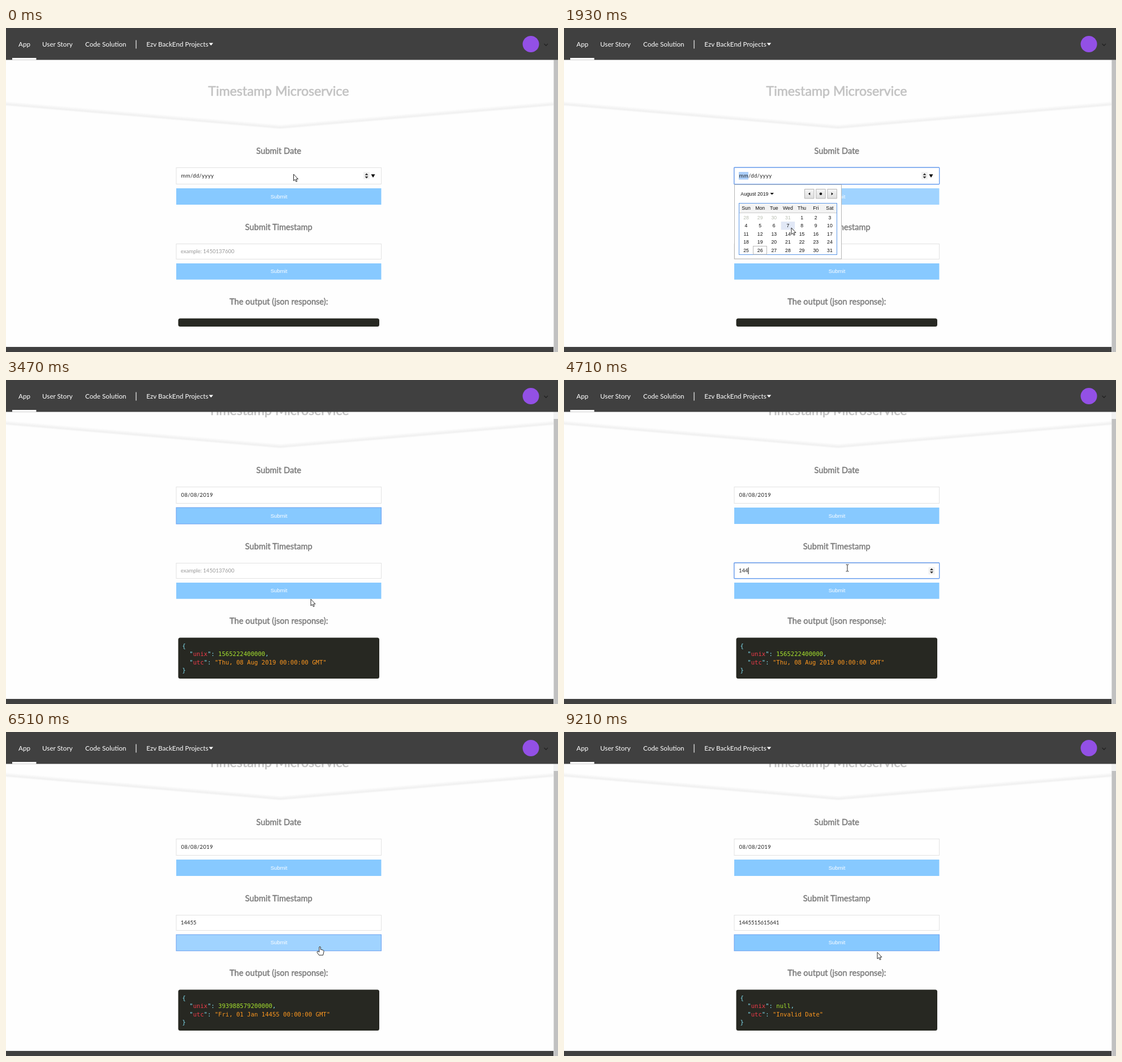
Write an HTML page that moves like this. It is 976 px wide and 574 px high and loops after 9530 ms.

```html
<!DOCTYPE html>
<html lang="en">
<head>
<meta charset="utf-8">
<title>Timestamp Microservice</title>
<style>
  html, body { margin: 0; width: 100%; height: 100%; overflow: hidden; background: #fefefe; }
  svg { display: block; font-family: Lato, sans-serif; }
  text { white-space: pre; }
  .nav { font-size: 11.7px; fill: #fff; }
  .heading { font-size: 14.6px; fill: #7b7b7b; stroke: #7b7b7b; stroke-width: .45; text-anchor: middle; }
  .title { font-size: 23.2px; fill: #c3c3c3; stroke: #c3c3c3; stroke-width: .7; text-anchor: middle; }
  .input { fill: #fff; stroke: #e2e2e2; }
  .focus { fill: none; stroke: #6a9ff0; stroke-width: 1.4; }
  .field { font-size: 9.5px; fill: #222; }
  .date { letter-spacing: .4px; }
  .label { font: 9.5px "Liberation Sans", Arial, sans-serif; fill: #fff; text-anchor: middle; }
  .calendar { font: 8.75px "Liberation Sans", Arial, sans-serif; fill: #111; }
  .day { text-anchor: middle; }
  .code { font: 10.6px "DejaVu Sans Mono", monospace; fill: #7fdcee; }
  .key { fill: #ee3b4a; } .number { fill: #a6e22e; } .string { fill: #fd971f; }
</style>
</head>
<body>
<svg width="976" height="574" viewBox="0 0 976 574">
  <defs>
    <linearGradient id="shade" x2="0" y2="1">
      <stop stop-color="#f0f0f0" stop-opacity="0"/>
      <stop offset=".65" stop-color="#f0f0f0"/>
      <stop offset="1" stop-color="#f0f0f0" stop-opacity="0"/>
    </linearGradient>
    <linearGradient id="bevel" x2="0" y2="1">
      <stop stop-color="#f6f6f6"/><stop offset="1" stop-color="#dedede"/>
    </linearGradient>
    <path id="spinner" d="M-3-1L0-4.5L3-1ZM-3 1.2L0 4.7L3 1.2Z" fill="#333"/>
  </defs>
  <rect width="976" height="574" fill="#fefefe"/>

  <g id="page">
    <path d="M0 0H485V9H0Z" transform="matrix(1 .085 0 1 0 129.5)" fill="url(#shade)"/>
    <path d="M0 0H484V9H0Z" transform="matrix(1 -.085 0 1 485 170.7)" fill="url(#shade)"/>
    <text class="title" x="482" y="120">Timestamp Microservice</text>

    <text class="heading" x="482.3" y="222.7">Submit Date</text>
    <rect class="input" x="301" y="247.5" width="362.5" height="29"/>
    <rect id="monthMark" x="309" y="255" width="17" height="13.5" fill="#a9cdf8"/>
    <text id="dateText" class="field date" x="309.5" y="265.2"></text>
    <g id="dateControls">
      <rect x="632" y="255" width="11" height="13" fill="#f1f1f1"/>
      <use href="#spinner" x="637.5" y="261.7"/>
      <path d="M645.5 259.3H652.5L649 265Z"/>
    </g>
    <rect id="dateFocus" class="focus" x="300.7" y="247" width="363" height="29.7" rx="1"/>
    <rect id="dateButton" x="301" y="284" width="362.5" height="29"/>
    <text class="label" x="482.5" y="302.3">Submit</text>

    <text class="heading" x="482.3" y="357.5">Submit Timestamp</text>
    <rect class="input" x="301" y="382.5" width="362.5" height="27"/>
    <text id="stampText" class="field" x="309" y="399.3"></text>
    <path id="caret" d="M0 390V402" stroke="#111"/>
    <g id="stampFocus">
      <rect class="focus" x="300.7" y="381.8" width="363" height="28" rx="1"/>
      <rect x="644.5" y="389.5" width="11" height="13" fill="#f1f1f1"/>
      <use href="#spinner" x="650" y="396"/>
    </g>
    <rect id="stampButton" x="301" y="417" width="362.5" height="28.7"/>
    <text class="label" x="482.5" y="434.3">Submit</text>

    <text class="heading" x="482.3" y="490">The output (json response):</text>
    <rect id="output" x="304.5" y="514.5" width="355.5" height="14.5" rx="3.5" fill="#272822"/>
    <g id="json" class="code">
      <text x="311.5" y="533">{</text>
      <text x="311.5" y="547.3">  "<tspan class="key">unix</tspan>": <tspan id="unix" class="number"></tspan>,</text>
      <text x="311.5" y="561.8">  "<tspan class="key">utc</tspan>": <tspan id="utc" class="string"></tspan></text>
      <text x="311.5" y="576.4">}</text>
    </g>
    <rect id="footer" y="565" width="968" height="80" fill="#404040"/>

    <g id="calendar" class="calendar">
      <rect x="301.5" y="277.5" width="189" height="131.5" fill="#fff" stroke="#b5b5b5"/>
      <text x="312.3" y="296.6">August 2019</text>
      <path d="M364.5 292H371L367.7 295.6Z"/>
      <g fill="url(#bevel)" stroke="#b4b4b4">
        <path d="M425.5 285.5H442V302H425.5ZM445.7 285.5H462.2V302H445.7ZM465.9 285.5H482.4V302H465.9Z"/>
      </g>
      <path d="M435.2 291.3V296.3L432 293.8ZM472.7 291.3V296.3L475.9 293.8Z"/>
      <circle cx="454" cy="293.8" r="2.3"/>
      <rect x="309.5" y="310.5" width="173" height="91" fill="#fff"/>
      <path d="M310 311H482V327.5H310Z" fill="#f3f3f3"/>
      <path d="M310 327.5H482" stroke="#ccc"/>
      <rect x="309.5" y="310.5" width="173" height="91" fill="none" stroke="#5b97e8"/>
      <rect id="hoverDay" y="343" width="24.5" height="14.5" fill="#e1e8f6"/>
      <rect x="334.5" y="386.5" width="24" height="14.5" fill="none" stroke="#b8b8b8"/>
      <g id="days"></g>
    </g>
  </g>

  <rect x="968" y="56" width="8" height="518" fill="#f1f1f1"/>
  <rect id="thumb" x="968.5" width="7.5" height="520" fill="#c1c1c1"/>

  <rect width="976" height="56.5" fill="#404040"/>
  <rect x="11" y="53" width="42.5" height="3.5" fill="#fff"/>
  <g class="nav">
    <text x="22" y="32.5">App</text>
    <text x="64" y="32.5">User Story</text>
    <text x="140" y="32.5">Code Solution</text>
    <path d="M229.5 21.5H230.6V36.5H229.5Z"/>
    <text x="248.3" y="32.5">Ezv BackEnd Projects</text>
    <path d="M358.7 26.5H366.3L362.5 31Z"/>
  </g>
  <circle cx="928" cy="28.5" r="14.5" fill="#9350e6"/>
  <path d="M951.5 28L954.8 31.3L958 28" fill="none" stroke="#222" stroke-width="1.3"/>

  <g id="cursor" stroke="#111" stroke-width=".9" fill="#fff" stroke-linejoin="round">
    <path id="arrow" d="M0 0V11.6L2.6 9.3L4.4 13.3L6.2 12.5L4.5 8.6H8Z"/>
    <path id="hand" d="M-1.2 1Q0-.6 1.2 1V5.2L5.6 6.4Q7.2 7 7 9.3L5.5 15.3H-1.6L-5 10.3Q-5 8-3 8.7L-1.2 10Z"/>
    <path id="beam" d="M-2.5-6H-.6L0-5.4L.6-6H2.5M0-5.4V5.4M-2.5 6H-.6L0 5.4L.6 6H2.5" fill="none"/>
  </g>
</svg>
<script>
const LOOP = 9530, SCROLL = 58;
const $ = id => document.getElementById(id);
const set = (id, attrs) => { for (const k in attrs) $(id).setAttribute(k, attrs[k]); };
const show = (id, on) => { $(id).style.display = on ? '' : 'none'; };
const write = (id, text) => { if ($(id).textContent !== text) $(id).textContent = text; };
const clamp = v => Math.max(0, Math.min(1, v));
const smooth = v => v * v * (3 - 2 * v);

// Pointer stops: time, x, y
const pointerPath = [
  [70, 508.5, 259], [610, 727, 275], [840, 727, 275], [1130, 649, 262], [1230, 649, 262],
  [1480, 580, 294], [1760, 402, 354], [1930, 402, 354], [2150, 421, 349], [2350, 421, 349],
  [2800, 496, 306], [3050, 496, 306], [3430, 539, 388.3], [3490, 539, 388.3], [3700, 501, 333],
  [5330, 501, 333], [5790, 555, 380], [5960, 555, 380], [6260, 554, 392], [6330, 554, 392],
  [6500, 555, 380], [6540, 555, 380], [6730, 534, 339], [6830, 534, 339], [6900, 537, 343],
  [8140, 537, 343], [8600, 555, 380], [8830, 555, 380], [9200, 554, 390.3]
];
// Typing: time, number of digits entered
const typing = [[4460, 1], [4540, 2], [4710, 3], [4780, 4], [4950, 5], [7210, 6], [7440, 8],
  [7590, 10], [7660, 12], [7740, 13]];
const STAMP = '1445515615641';

const responses = [
  [3000, '1565222400000', '"Thu, 08 Aug 2019 00:00:00 GMT"'],
  [5960, '393988579200000', '"Fri, 01 Jan 14455 00:00:00 GMT"'],
  [8830, 'null', '"Invalid Date"']
];

const latest = (list, t) => list.filter(item => t >= item[0]).pop();

function pointerAt(t) {
  const next = pointerPath.findIndex(stop => stop[0] > t);
  if (next === 0) return pointerPath[0].slice(1);
  if (next < 0) return pointerPath.at(-1).slice(1);
  const [t0, x0, y0] = pointerPath[next - 1], [t1, x1, y1] = pointerPath[next];
  const p = smooth((t - t0) / (t1 - t0));
  return [x0 + (x1 - x0) * p, y0 + (y1 - y0) * p];
}

function buildCalendar() {
  const add = (text, col, y, fill) => {
    const el = document.createElementNS('http://www.w3.org/2000/svg', 'text');
    el.setAttribute('class', 'day');
    el.setAttribute('x', 322 + col * 24.65);
    el.setAttribute('y', y);
    el.setAttribute('fill', fill);
    el.textContent = text;
    $('days').append(el);
  };
  'Sun Mon Tue Wed Thu Fri Sat'.split(' ').forEach((name, i) => add(name, i, 322, '#111'));
  for (let i = 0; i < 35; i++) {
    const day = i < 4 ? 28 + i : i - 3;
    add(day, i % 7, 338.6 + Math.floor(i / 7) * 14.5, i < 4 ? '#b9beb2' : '#111');
  }
}

function paintButton(id, hovered, focused) {
  set(id, { fill: hovered ? '#a0d3ff' : '#87c9ff', stroke: focused ? '#6a9ff0' : 'none' });
}

function render(t) {
  const [x, y] = pointerAt(t);
  const response = latest(responses, t);
  const scroll = SCROLL * smooth(clamp((t - 3000) / 380));
  const pageY = y + scroll;
  const popup = t >= 1230 && t < 2310;
  const overPopup = popup && x < 491 && pageY > 277 && pageY < 409;
  const over = (top, bottom) => !overPopup && x > 301 && x < 664 && pageY >= top && pageY <= bottom;
  const overDateButton = over(284, 313), overStampButton = over(417, 445.8);
  const overStamp = over(382, 410);
  const dateFocused = t >= 1230 && t < 2800;
  const stampFocused = t >= 3850 && t < 5750 || t >= 6730 && t < 8580;

  set('page', { transform: `translate(0 ${-scroll})` });
  set('thumb', { y: 56.5 + 12.5 * scroll / SCROLL });

  write('dateText', t < 2310 ? 'mm/dd/yyyy' : '08/08/2019');
  show('monthMark', dateFocused);
  show('dateFocus', dateFocused);
  show('dateControls', dateFocused || over(247, 277));
  show('calendar', popup);
  set('hoverDay', { x: x < 408 ? 383.7 : 408.4 });
  show('hoverDay', overPopup && x < 433 && pageY > 342);
  paintButton('dateButton', overDateButton || popup && t > 1400, t >= 2800 && t < 3850);

  const count = latest(typing, t)?.[1] ?? 0;
  const blank = count === 0 && t < 4460;
  write('stampText', blank ? (t < 3850 || stampFocused ? 'example: 1450137600' : '') : STAMP.slice(0, count));
  $('stampText').style.fill = blank ? '#999' : '#222';
  show('stampFocus', stampFocused);
  show('caret', stampFocused && !(t >= 4310 && t < 4460));
  set('caret', { transform: `translate(${309.5 + $('stampText').getSubStringLength(0, count)} 0)` });
  paintButton('stampButton', overStampButton, t >= 5750 && t < 6730 || t >= 8580);

  set('output', { height: response ? 72.5 : 14.5 });
  set('footer', { y: response ? 565 + SCROLL : 565 });
  show('json', response);
  if (response) {
    write('unix', response[1]);
    write('utc', response[2]);
  }

  set('cursor', { transform: `translate(${x} ${y})` });
  const hand = overDateButton || overStampButton;
  show('hand', hand);
  show('beam', overStamp);
  show('arrow', !hand && !overStamp);
}

buildCalendar();
const start = performance.now();
function tick() {
  render((performance.now() - start) % LOOP);
  requestAnimationFrame(tick);
}
tick();
</script>
</body>
</html>
```
